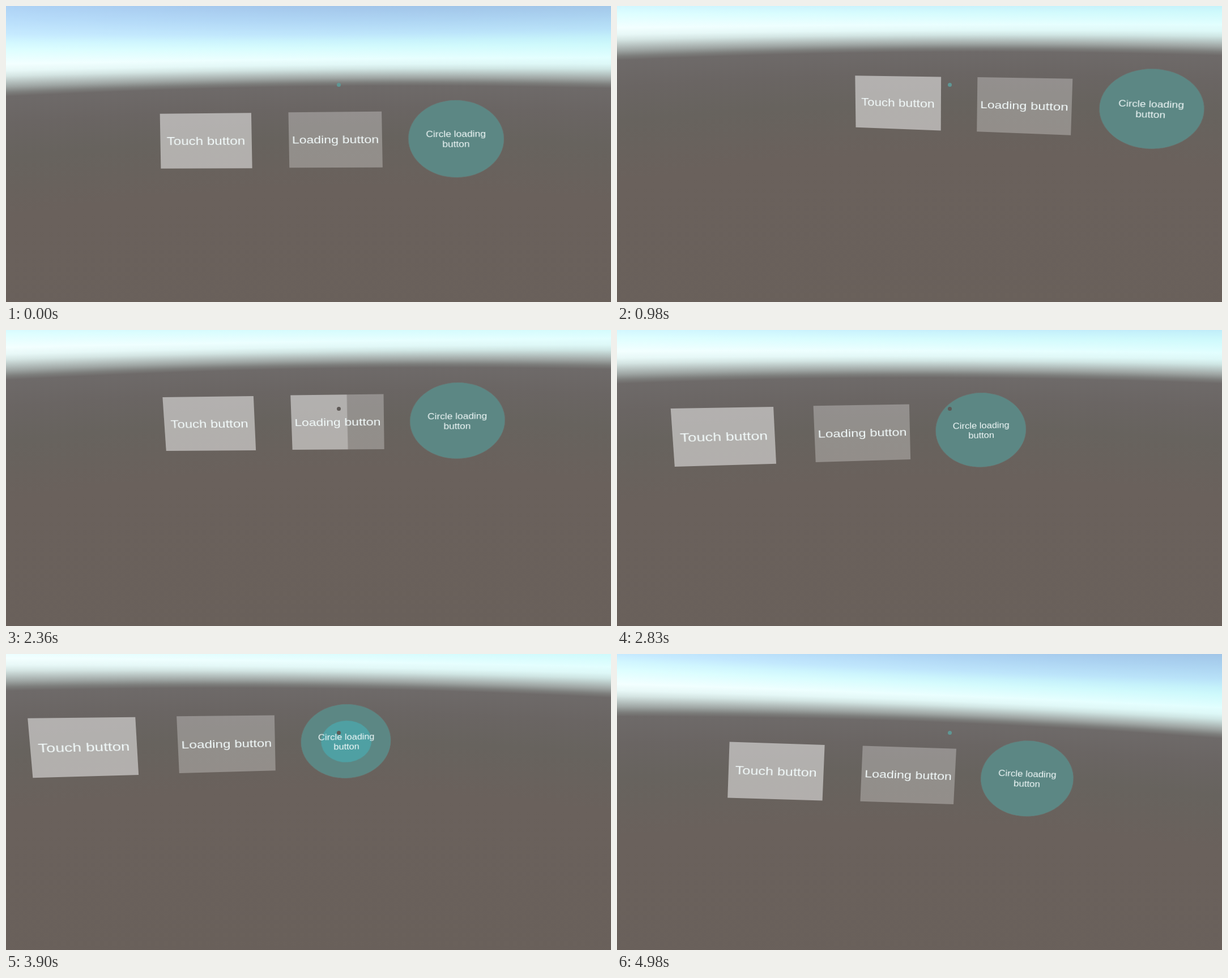
Recreate the animation shown at these times as an HTML page with a canvas. Size 1068 by 524 pixels, loop 5050 ms.

```html
<!DOCTYPE html>
<html lang="en">
<head>
<meta charset="utf-8">
<title>Gaze buttons</title>
<style>
  html, body { margin: 0; width: 100%; height: 100%; overflow: hidden; background: #69605a; }
  #stage { position: relative; width: 1068px; height: 524px; overflow: hidden; }
  #view { position: absolute; left: 0; top: 0; }
  .btn {
    position: absolute; left: 0; top: 0; width: 160px; height: 117px;
    transform-origin: 0 0; color: #f2fafa; text-align: center; white-space: nowrap;
    font: 22.5px/117px "Liberation Sans", Arial, sans-serif;
  }
  .btn span { position: absolute; left: 0; width: 100%; }
  .btn i { position: absolute; left: 0; top: 0; width: 100%; height: 100%; }
  #touch { background: rgba(255, 255, 255, .49); font-size: 24px; }
  #load { background: rgba(255, 255, 255, .28); }
  #load i { background: rgba(255, 255, 255, .29); transform-origin: 0 0; }
  #circle {
    height: 145px; border-radius: 50%; background: #5c8784;
    font-size: 16.6px; line-height: 19px; box-shadow: 0 0 1px #6f7c79;
  }
  #circle i { border-radius: 50%; background: #4fa0a3; }
  #circle span { top: 54px; }
  #dot { position: absolute; left: 583.5px; top: 135.5px; width: 7px; height: 7px; border-radius: 50%; }
</style>
</head>
<body>
<div id="stage">
  <canvas id="view" width="1068" height="524"></canvas>
  <div class="btn" id="touch"><span>Touch button</span></div>
  <div class="btn" id="load"><i></i><span>Loading button</span></div>
  <div class="btn" id="circle"><i></i><span>Circle loading<br>button</span></div>
  <div id="dot"></div>
</div>
<script>
const $ = s => document.querySelector(s);
const { sin, cos, tan, hypot, abs, min, max, floor, PI } = Math;
const LOOP = 5050, STEP = 76.8, FILL_TIME = 1975;
const W = 1068, H = 524;
const CX = 587, CY = 139, FX = 877, FY = 720;   // optical centre and focal lengths
const TILT = 4.7 * PI / 180;                    // the panel wall leans towards the viewer
const HAZE = 62, HAZE_TILT = .006;              // ground edge below eye level, and its lean

// Buttons on a wall one unit away: centre and half size.
const touch = { el: $('#touch'), x: -.329, y: .137, w: .095, h: .0688 };
const load = { el: $('#load'), x: -.0636, y: .136, w: .0942, h: .0686 };
const circle = { el: $('#circle'), x: .177, y: .1355, w: .0938, h: .0938, round: true };
const buttons = [touch, load, circle];

// Head movement: time in ms, then yaw, pitch (down) and roll in degrees.
const keys = [
  [0, -3.16, 4.7, -1.1],
  [600, -11, 8.6, -.8],
  [800, -14.5, 8.9, -.7],
  [1100, -10.2, 9.9, -.7],
  [1440, -4.85, 11.38, -.8],
  [2360, -3.53, 10.5, -1.4],
  [2670, 2.4, 7.7, -.6],
  [2810, 6.3, 9.1, -.2],
  [3360, 9.62, 11.26, .2],
  [4440, 8.17, 10.2, 1.2],
  [4820, 3.1, 7.1, 2],
  [4980, .88, 6.29, 2.4]
];

// Monotone cubic through the keys, so nothing overshoots.
const slope = (k, i) => (keys[k + 1][i] - keys[k][i]) / (keys[k + 1][0] - keys[k][0]);
function tangent(k, i) {
  if (k === 0 || k === keys.length - 1) return 0;
  const a = slope(k - 1, i), b = slope(k, i);
  return a * b <= 0 ? 0 : 2 * a * b / (a + b);
}
function poseAt(t) {
  let k = 0;
  while (k < keys.length - 2 && t >= keys[k + 1][0]) k++;
  const p = keys[k], q = keys[k + 1], d = q[0] - p[0];
  const u = min(1, (t - p[0]) / d), u2 = u * u, u3 = u2 * u;
  const [yaw, pitch, roll] = [1, 2, 3].map(i => PI / 180 * (
    p[i] + (q[i] - p[i]) * (3 * u2 - 2 * u3)
    + d * (tangent(k, i) * (u3 - 2 * u2 + u) + tangent(k + 1, i) * (u3 - u2))));
  return { yaw, pitch, roll };
}

// Wall point to screen point.
function project(a, b, { yaw, pitch, roll }) {
  const y = b * cos(TILT) + sin(TILT), z = cos(TILT) - b * sin(TILT);
  const side = a * cos(yaw) - z * sin(yaw), ahead = a * sin(yaw) + z * cos(yaw);
  const depth = ahead * cos(pitch) + y * sin(pitch);
  const u = side / depth, v = (y * cos(pitch) - ahead * sin(pitch)) / depth;
  return [CX + FX * (u * cos(roll) - v * sin(roll)), CY + FY * (v * cos(roll) + u * sin(roll))];
}

// Is the gaze on this button?
function gazed(btn, { yaw, pitch }) {
  const y = sin(pitch), z = cos(pitch) * cos(yaw);
  const depth = y * sin(TILT) + z * cos(TILT);
  const dx = (cos(pitch) * sin(yaw) / depth - btn.x) / btn.w;
  const dy = ((y * cos(TILT) - z * sin(TILT)) / depth - btn.y) / btn.h;
  return btn.round ? hypot(dx, dy) < 1 : max(abs(dx), abs(dy)) < 1;
}
function progress(btn, t) {
  let s = t;
  while (s > 0 && t - s < FILL_TIME && gazed(btn, poseAt(s))) s -= 10;
  return min(1, (t - s) / FILL_TIME);
}

const ctx = $('#view').getContext('2d');
function ramp(stops) {
  const g = ctx.createLinearGradient(0, -240, 0, 520);
  for (const [y, c] of stops) g.addColorStop((y + 240) / 760, c);
  return g;
}
const sky = ramp([
  [-240, '#8fb0da'], [-140, '#abcff3'], [-115, '#b7dcfa'], [-92, '#c6eaff'], [-80, '#d2f7ff'],
  [-68, '#defeff'], [-48, '#f3ffff'], [-38, '#e8f8f7'], [-30, '#d5e5e3'], [-14, '#9ea5a3'],
  [-6, '#7d7e7c'], [0, '#6e6a69'], [40, '#6a6563'], [90, '#67635e'], [180, '#6a615c'], [520, '#69605a']
]);
const shade = ramp([[-140, '#203a60'], [-90, '#40a0c0'], [-50, '#40f8f8'], [-15, 'rgba(64,248,248,0)']]);

// Lines of equal height above the ground bend away from the centre column.
function drawSky({ pitch, roll }) {
  const lean = tan(roll) * FY / FX + HAZE_TILT;
  for (let x = 0; x < W; x += 2) {
    const s = hypot(1, (x - CX) / FX);
    const y = CY - FY * tan(pitch) + lean * (x - CX) + HAZE * s;
    ctx.setTransform(1, 0, 0, s, 0, y);
    for (const [fill, alpha] of [[sky, 1], [shade, .1 * x / W]]) {
      ctx.globalAlpha = alpha;
      ctx.fillStyle = fill;
      ctx.fillRect(x, -y / s - 2, 2, H / s + 4);
    }
  }
}

// Perspective matrix that maps a w by h box onto four corners.
function quad([[x0, y0], [x1, y1], [x2, y2], [x3, y3]], w, h) {
  const sx = x0 - x1 + x2 - x3, sy = y0 - y1 + y2 - y3;
  const ax = x1 - x2, ay = y1 - y2, bx = x3 - x2, by = y3 - y2;
  const det = ax * by - bx * ay;
  const g = (sx * by - bx * sy) / det, k = (ax * sy - sx * ay) / det;
  const m = [
    (x1 - x0 + g * x1) / w, (y1 - y0 + g * y1) / w, 0, g / w,
    (x3 - x0 + k * x3) / h, (y3 - y0 + k * y3) / h, 0, k / h,
    0, 0, 1, 0, x0, y0, 0, 1
  ];
  return `matrix3d(${m.map(v => v.toFixed(7))})`;
}
function place({ el, x, y, w, h }, pose) {
  const corners = [[-1, -1], [1, -1], [1, 1], [-1, 1]]
    .map(([i, j]) => project(x + i * w, y + j * h, pose));
  el.style.transform = quad(corners, el.offsetWidth, el.offsetHeight);
}

const loadFill = $('#load i'), circleFill = $('#circle i'), dot = $('#dot');

function render(now) {
  const n = min(65, floor((now % LOOP + 21) / STEP));
  const t = max(0, n * STEP - 16);
  const pose = poseAt(t);
  drawSky(pose);
  for (const b of buttons) place(b, pose);
  loadFill.style.transform = `scaleX(${progress(load, t)})`;
  circleFill.style.transform = `scale(${progress(circle, t)})`;
  dot.style.background = buttons.some(b => gazed(b, pose)) ? '#5f5a57' : '#5f9795';
}

function tick(now) {
  render(now);
  requestAnimationFrame(tick);
}
render(0);
requestAnimationFrame(tick);
</script>
</body>
</html>
```
